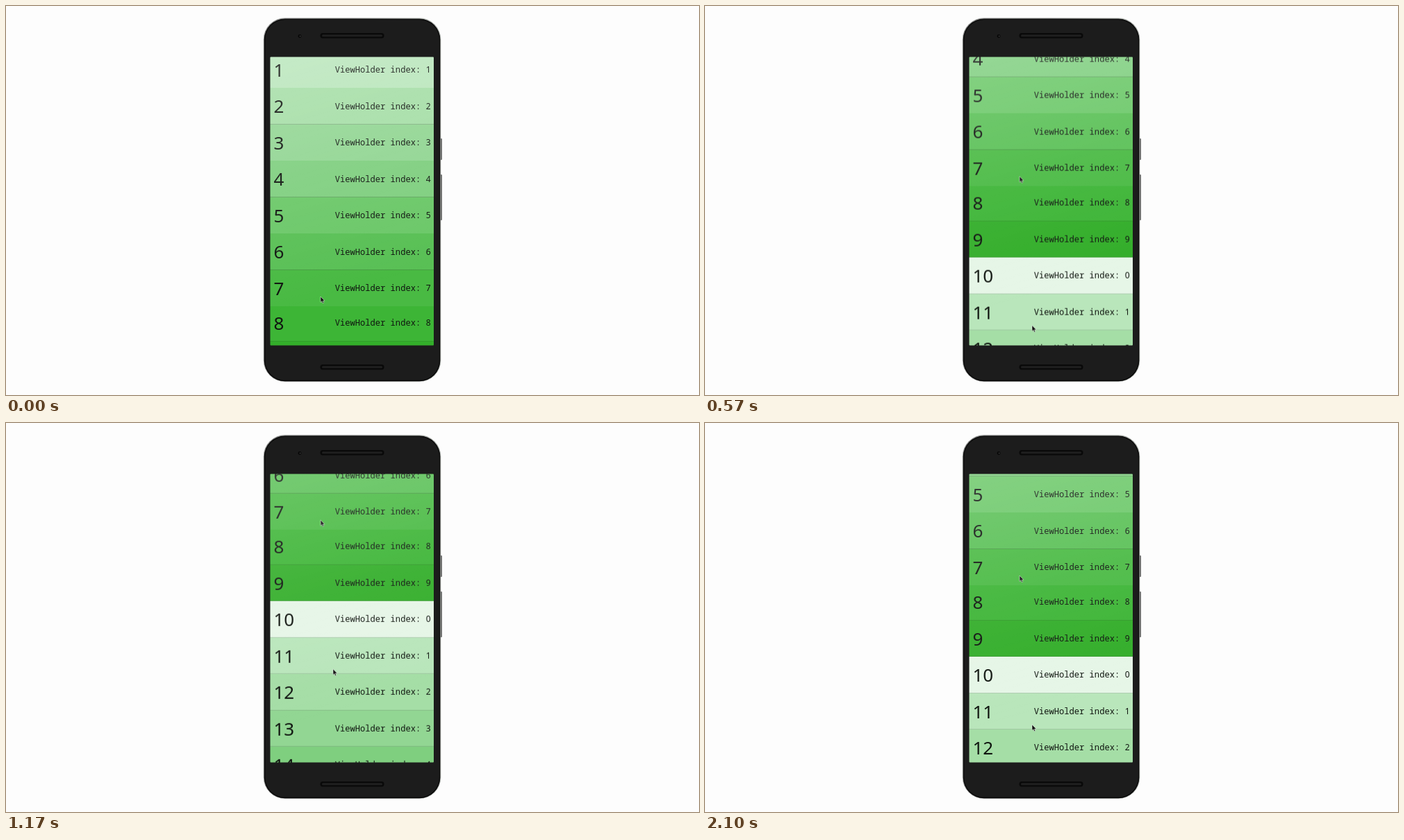
An HTML page for the animation above (2.13 s loop, 998 px wide and 561 px high).

```html
<!DOCTYPE html>
<html lang="en">
<head>
<meta charset="utf-8">
<title>Scrolling list</title>
<style>
  html, body { margin: 0; width: 100%; height: 100%; overflow: hidden; background: #fdfdfd; }
  svg { display: block; width: 100%; height: 100%; }
  .num { font: 26px "Noto Sans", sans-serif; fill: #101510; }
  .label { font: 12.1px "Noto Sans Mono", monospace; fill: #101510; white-space: pre; }
  .digit { font: 12.1px "Noto Sans", sans-serif; fill: #101510; text-anchor: middle; }
  .cursor { fill: #111; stroke: #fff; stroke-opacity: .65; stroke-width: .7; }
  #list { animation: scroll 2130ms cubic-bezier(.3333, 0, .6667, 1) infinite; }
  @keyframes scroll {
    0%, 2.82% { transform: translateY(0); }
    44.27%, 51.55% { transform: translateY(-281px); }
    90.94%, 100% { transform: translateY(-199px); }
  }
</style>
</head>
<body>
<svg viewBox="0 0 998 561" preserveAspectRatio="none">
  <defs>
    <clipPath id="screen"><rect x="380.5" y="73.5" width="235.5" height="416" rx="1"/></clipPath>
    <linearGradient id="glare" gradientUnits="userSpaceOnUse" x1="440" y1="60" x2="540" y2="400">
      <stop offset="0" stop-color="#fff" stop-opacity=".17"/>
      <stop offset=".5" stop-color="#fff" stop-opacity=".07"/>
      <stop offset="1" stop-color="#fff" stop-opacity="0"/>
    </linearGradient>
    <linearGradient id="rim" x1="0" y1="0" x2="1" y2="0">
      <stop offset="0" stop-color="#8f908f"/>
      <stop offset=".5" stop-color="#8a8b8a"/>
      <stop offset="1" stop-color="#b9bdb8"/>
    </linearGradient>
    <g id="slot">
      <rect x="452.5" width="92" height="7.5" rx="3.5" fill="#090909"/>
      <rect x="455" y="2.2" width="87" height="3" rx="1.5" fill="#1f1f1f"/>
    </g>
    <path id="arrow" class="cursor" d="M0 0V8.4L1.9 6.7L3.2 9.7L4.6 9.1L3.4 6.2H6Z"/>
  </defs>

  <rect x="625" y="191" width="2.8" height="31" rx="1" fill="#4a4a4a"/>
  <rect x="625" y="243" width="2.8" height="66" rx="1" fill="#4a4a4a"/>
  <rect x="370.8" y="17.2" width="255.6" height="524.6" rx="31" fill="url(#rim)"/>
  <rect x="371.8" y="18.4" width="253.6" height="522.8" rx="30" fill="#0b0b0b"/>
  <rect x="373.3" y="20" width="250.6" height="519.6" rx="28.5" fill="#1c1c1c"/>
  <use href="#slot" y="39"/>
  <use href="#slot" y="517"/>
  <circle cx="423" cy="43.5" r="2.4" fill="#080808"/>
  <circle cx="423.6" cy="43.5" r=".9" fill="#3c3c3c"/>

  <g clip-path="url(#screen)">
    <g id="list">
      <g id="rows"></g>
      <use href="#arrow" x="453" y="419"/>
      <use href="#arrow" x="471" y="634"/>
    </g>
    <rect x="380" y="73" width="237" height="417" fill="url(#glare)"/>
  </g>
</svg>
<script>
  const shades = ['#e6f6e7', '#b9e6bb', '#a5dea6', '#92d693', '#7fcf7f',
                  '#6bc868', '#59c055', '#49ba43', '#3db536', '#33ae2a'];
  const rows = document.getElementById('rows');

  function add(tag, attrs, text = '') {
    const el = document.createElementNS('http://www.w3.org/2000/svg', tag);
    for (const name in attrs) el.setAttribute(name, attrs[name]);
    el.textContent = text;
    rows.append(el);
  }

  // Built bottom up, so row 7 overlaps the slightly raised row 8.
  for (let n = 14; n > 0; n--) {
    const top = 65.4 + 52.5 * (n - 1) - (n > 7 ? 2.2 : 0);
    const index = n % 10;
    add('rect', { x: 380, y: top, width: 237, height: 52.6, fill: shades[index] });
    add('text', { class: 'num', x: 385.4, y: top + 36.4 }, n);
    add('text', { class: 'label', x: 473.8, y: top + 30.7 }, 'ViewHolder index:');
    add('text', { class: 'digit', x: 608.2, y: top + 30.7 }, index);
  }
</script>
</body>
</html>
```
